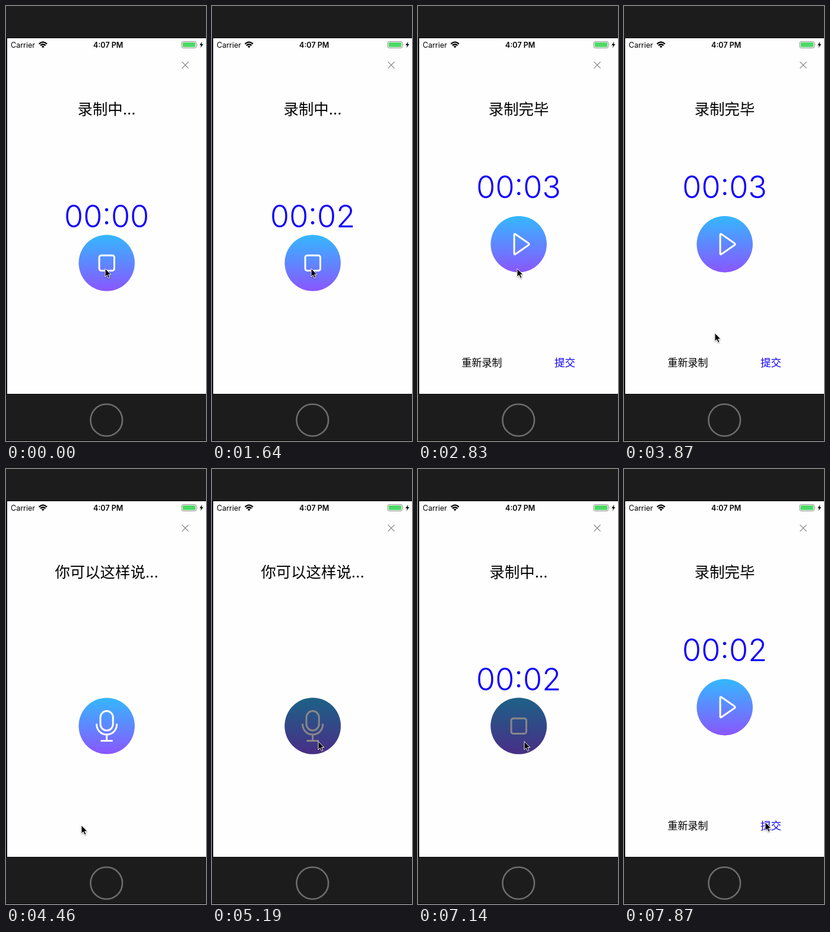
Write an HTML page that moves like this. It is 337 px wide and 729 px high and loops after 8 s.

```html
<!DOCTYPE html>
<html lang="zh-CN">
<head>
<meta charset="utf-8">
<style>
html, body { margin: 0; height: 100%; overflow: hidden; background: #1c1c1c; }
svg { display: block; width: 100vw; height: 100vh; font-family: Inter, "Noto Sans CJK SC", "Noto Sans CJK", sans-serif; }
.mid { text-anchor: middle; }
.line { fill: none; stroke: #fff; stroke-width: 3; stroke-linecap: round; stroke-linejoin: round; }
</style>
</head>
<body>
<svg viewBox="0 0 337 729">
  <defs>
    <linearGradient id="grad" x2="0" y2="1">
      <stop stop-color="#34b8ff"/><stop offset="1" stop-color="#8a56ff"/>
    </linearGradient>
  </defs>
  <rect width="337" height="729" fill="#1c1c1c"/>
  <path d="M0 53H337V651H0zM0 728H337V729H0z" fill="#050505"/>
  <rect x="2" y="54" width="335" height="596" fill="#fefefe"/>
  <circle cx="169.3" cy="694" r="26.8" fill="none" stroke="#6c6c6c" stroke-width="2.6"/>

  <text x="8" y="69.5" font-size="12.5">Carrier</text>
  <g fill="none" stroke="#000" stroke-width="2.3">
    <path d="M55.6 63.6Q62.3 57.2 69 63.6M58 66.2Q62.3 62.2 66.6 66.2"/>
    <path d="M62.3 70.2L59.9 67.8Q62.3 65.8 64.7 67.8z" fill="#000" stroke="none"/>
  </g>
  <text class="mid" x="172.2" y="69.5" font-size="12.5" font-weight="600">4:07 PM</text>
  <rect x="296" y="59.5" width="24.6" height="10.8" rx="2.4" fill="none" stroke="#8c8c8c"/>
  <rect x="297.6" y="61" width="21.4" height="7.8" rx="1" fill="#4cd964"/>
  <path d="M322 63.2Q323.6 64.9 322 66.6z" fill="#8c8c8c"/>
  <path d="M330.6 59.5L326.2 65.8H329L327.6 70.4L332.4 63.8H329.5z"/>
  <path d="M296.5 93.5L307.5 104.5M307.5 93.5L296.5 104.5" stroke="#8a8a8a" stroke-width="1.1"/>

  <text class="mid" id="title" x="169.6" y="181.7" font-size="25.4"></text>
  <text class="mid" id="timer" x="169.6" font-size="52" font-weight="300" fill="#1000ff"></text>
  <g id="button">
    <circle r="47.2" fill="url(#grad)"/>
    <rect id="stop" class="line" x="-12.6" y="-12.6" width="25.4" height="25.4" rx="3.2"/>
    <path id="play" class="line" d="M-7.6 -15.5Q-7.6 -18 -5.4 -16.6L16.4 -1.6Q18.6 0 16.4 1.6L-5.4 16.6Q-7.6 18 -7.6 15.5z"/>
    <g id="mic" class="line">
      <rect x="-10.6" y="-25" width="21.2" height="32.6" rx="10.6"/>
      <path d="M-17 -2.5A16.6 16.6 0 0 0 17 -2.5M0 14.5V25M-9 25H9"/>
    </g>
    <circle id="shade" r="47.4" opacity=".47"/>
  </g>
  <g id="actions" class="mid">
    <text x="107.4" y="604" font-size="17">重新录制</text>
    <text x="247.6" y="604" font-size="17.6" font-weight="500" fill="#1000ff">提交</text>
  </g>
  <path id="cursor" d="M0 0V14L3.2 11L5.6 16.2L8 15.1L5.7 10.1H10z" stroke="#fff" stroke-width="1" style="filter:drop-shadow(0 1px 1px #0006)"/>
</svg>
<script>
const $ = id => document.getElementById(id);
const TITLES = { mic: '你可以这样说...', stop: '录制中...', play: '录制完毕' };
const STEP = 147;

// [start ms, icon, seconds, pressed]
const STATES = [
  [0, 'stop', 0], [600, 'stop', 1], [1640, 'stop', 2], [2540, 'stop', 3],
  [2690, 'stop', 3, true], [2830, 'play', 3], [4460, 'mic', 0],
  [5190, 'mic', 0, true], [5340, 'stop', 0], [5490, 'stop', 1],
  [6390, 'stop', 2], [7140, 'stop', 2, true], [7290, 'play', 2]
];
// [start ms, steps, from, bend, to]
const MOVES = [
  [3280, 8, [167, 440], [178, 520], [127, 597]],
  [4750, 3, [127, 597], [150, 520], [179, 456.5]],
  [7430, 4, [179, 456.5], [205, 540], [238, 592]]
];

function cursorAt(t) {
  const move = MOVES.findLast(m => t >= m[0]);
  if (!move) return MOVES[0][2];
  const [start, steps, a, b, c] = move;
  const k = Math.min(1, (Math.floor((t - start) / STEP + .03) + 1) / steps);
  const u = k * k * (3 - 2 * k);
  return a.map((p, i) => (1 - u) ** 2 * p + 2 * u * (1 - u) * b[i] + u * u * c[i]);
}

const show = (id, on) => $(id).style.display = on ? '' : 'none';

function draw(now) {
  const t = now % 8000;
  const [, icon, seconds, pressed] = STATES.findLast(s => t >= s[0]);
  const done = icon === 'play';
  $('title').textContent = TITLES[icon];
  $('timer').textContent = '00:0' + seconds;
  $('timer').setAttribute('y', done ? 322 : 371);
  $('button').setAttribute('transform', `translate(169.7 ${done ? 399.2 : 430.6})`);
  for (const id in TITLES) show(id, id === icon);
  show('timer', icon !== 'mic');
  show('actions', done);
  show('shade', pressed);
  $('cursor').setAttribute('transform', `translate(${cursorAt(t)})`);
  requestAnimationFrame(draw);
}
draw(performance.now());
</script>
</body>
</html>
```
